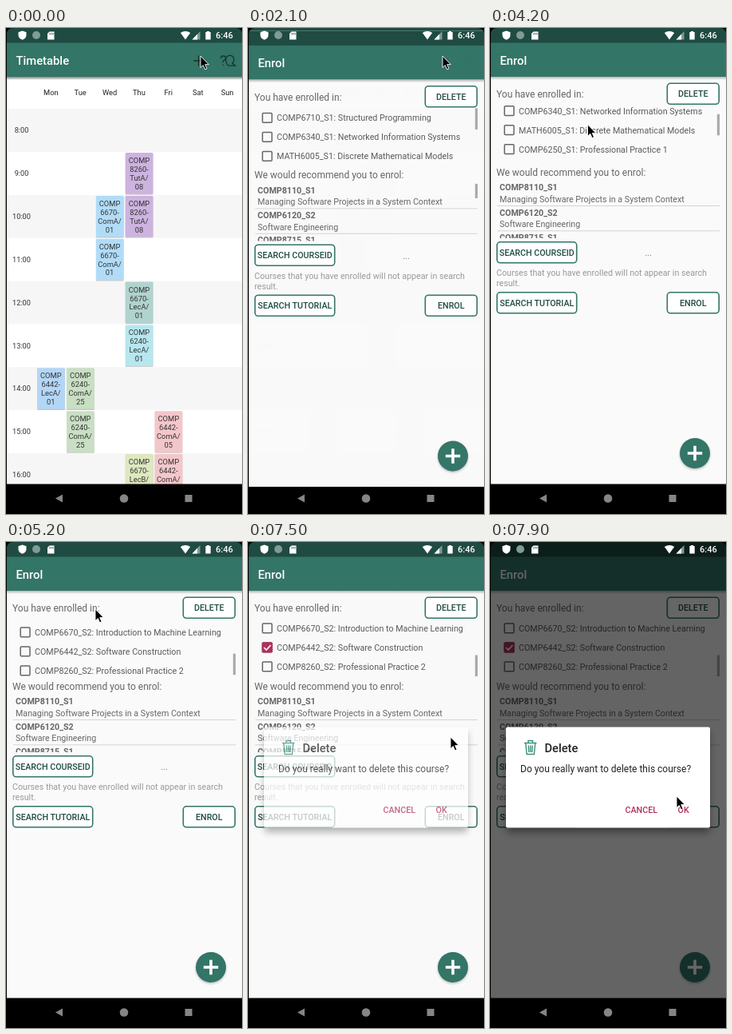
These frames come from a looping animation (296 by 608 pixels, 8000 ms). An HTML page:

```html
<!DOCTYPE html>
<html lang="en">
<head>
<meta charset="utf-8">
<title>Timetable</title>
<style>
html, body { margin: 0; width: 100%; height: 100%; overflow: hidden; background: #000; }
svg { display: block; }
text { font-family: Roboto, sans-serif; }
</style>
</head>
<body>
<svg id="stage" width="296" height="608" viewBox="0 0 296 608"></svg>
<script>
const GREEN = '#337567', DARK = '#1f4b42', PINK = '#b3305a';
const $ = id => document.getElementById(id);

const rect = (x, y, w, h, fill, more = '') =>
  `<rect x="${x}" y="${y}" width="${w}" height="${h}" fill="${fill}" ${more}/>`;
const path = (d, fill, more = '') => `<path d="${d}" fill="${fill}" ${more}/>`;
// Text placed by the middle of its capitals
const text = (x, mid, s, size, fill, weight = 400, anchor = 'start') =>
  `<text x="${x}" y="${mid + size * 0.355}" font-size="${size}" fill="${fill}" font-weight="${weight}" text-anchor="${anchor}">${s}</text>`;
const label = (x, mid, s, size, fill, weight) => text(x, mid, s, size, fill, weight, 'middle');

const chrome = (title, bg) =>
  rect(1, 0, 295, 571, bg) +
  rect(1, 61, 295, 4, 'url(#fall)') +
  rect(1, 0, 295, 19, DARK) + rect(1, 18.5, 295, 42.5, GREEN) +
  text(12.5, 40.5, title, 14.8, '#fff', 500) +
  rect(1, 570.5, 295, 60, '#000');

function timetable() {
  const colW = 36.875, rowH = 53.85, top = 101.2;
  const colors = { purple: '#cdb3df', sky: '#b1dcf8', teal: '#b1d3cf', cyan: '#b6e7ee',
    blue: '#b4d6f6', green: '#c8dfc3', pink: '#f4c6ca', lime: '#dde8bf' };
  const classes = [
    [4, 9, '8260 TutA 08', 'purple'], [4, 10, '8260 TutA 08', 'purple'],
    [3, 10, '6670 ComA 01', 'sky'], [3, 11, '6670 ComA 01', 'sky'],
    [4, 12, '6670 LecA 01', 'teal'], [4, 13, '6240 LecA 01', 'cyan'],
    [1, 14, '6442 LecA 01', 'blue'], [2, 14, '6240 ComA 25', 'green'],
    [2, 15, '6240 ComA 25', 'green'], [5, 15, '6442 ComA 05', 'pink'],
    [4, 16, '6670 LecB 01', 'lime'], [5, 16, '6442 ComA 05', 'pink']];
  let s = '';
  for (let h = 8; h <= 16; h++) {
    const y = top + (h - 8) * rowH;
    s += rect(1, y, 295, rowH, h % 2 ? '#fff' : '#f6f6f6') +
      label(19.5, y + rowH / 2, h + ':00', 9.2, '#333');
  }
  ['Mon', 'Tue', 'Wed', 'Thu', 'Fri', 'Sat', 'Sun'].forEach((d, i) =>
    s += label(1 + colW * (i + 1.5), 81, d, 9.3, '#222'));
  for (const [col, hour, name, color] of classes) {
    const x = 1 + col * colW, y = top + (hour - 8) * rowH;
    const [code, kind, group] = name.split(' ');
    s += rect(x + 1.3, y + 2, colW - 2.2, rowH - 2.2, '#000', 'opacity=".2" rx="1"') +
      rect(x + 1.2, y + 1, colW - 2.2, rowH - 2.4, colors[color], 'rx="1"');
    ['COMP', code + '-', kind + '/', group].forEach((line, i) =>
      s += label(x + colW / 2, y + 10.7 + i * 10.9, line, 9.33, '#333'));
  }
  const line = 'stroke="#17332d" stroke-width="1.3"';
  return rect(1, 61, 295, 41, '#fff') +
    chrome('Timetable', '#fff').replace(rect(1, 570.5, 295, 60, '#000'), s + rect(1, 570.5, 295, 60, '#000')) +
    rect(1, 61, 295, 4, 'url(#fall)') +
    path('M235 41h13M241.500 34.500v13', 'none', line) +
    path('M269.500 38q0-3 3-3t3 2.700q0 1.800-2 2.800t-1.300 2.500M272.200 45.500v1.300M276.300 42.500a5.300 5.300 0 1 1 7.500 1.500l3.700 3.200h-6.500q-4 0-4.700-4.700', 'none', line);
}

function button(x, y, w, s) {
  return rect(x + .8, y + .8, w - 1.6, 26, '#fff', `rx="4" stroke="${GREEN}" stroke-width="1.6"`) +
    label(x + w / 2, y + 14, s, 10.7, DARK, 500);
}

function enrol() {
  const courses = ['COMP6710_S1: Structured Programming', 'COMP6340_S1: Networked Information Systems',
    'MATH6005_S1: Discrete Mathematical Models', 'COMP6250_S1: Professional Practice 1',
    'COMP6240_S2: Relational Databases', 'COMP6670_S2: Introduction to Machine Learning',
    'COMP6442_S2: Software Construction', 'COMP8260_S2: Professional Practice 2'];
  const advice = [['COMP8110_S1', 'Managing Software Projects in a System Context'],
    ['COMP6120_S2', 'Software Engineering'], ['COMP8715_S1', 'Computing Project']];
  const rows = courses.map((c, i) => {
    const y = 12 + 24 * i;
    return rect(18.2, y - 6, 11.8, 11.8, 'none', 'rx="1" stroke="#666" stroke-width="1.5"') +
      text(36, y, c, 10.7, '#5a5a5a');
  }).join('');
  const tips = advice.map(([code, name], i) => {
    const y = 9.5 + 31.3 * i;
    return text(12, y, code, 10.7, '#666', 700) + text(12, y + 14.5, name, 10.7, '#666') +
      rect(9, y + 22.5, 279, 1, '#d4d4d4');
  }).join('');
  const tick = `<g id="tick">${rect(17.500, 149.300, 13.200, 13.200, PINK, 'rx="1.5"')}` +
    path('M20 156l3 3 5.500-6', 'none', 'stroke="#fff" stroke-width="1.6"') + '</g>';
  return chrome('Enrol', '#fafafa') +
    text(8, 83, 'You have enrolled in:', 12, '#666') +
    button(221.500, 68.500, 66.500, 'DELETE') +
    `<svg x="0" y="97" width="296" height="71"><g id="list">${rows}${tick}</g></svg>` +
    rect(284.800, 97, 3.200, 26.500, '#aaa', 'id="bar"') +
    text(8, 180.500, 'We would recommend you to enrol:', 12, '#666') +
    `<svg x="0" y="190" width="296" height="73">${tips}</svg>` +
    rect(284.800, 191.500, 3.200, 18, '#aaa', 'id="bar2"') +
    button(8, 267, 101.500, 'SEARCH COURSEID') +
    label(198.500, 281.500, '...', 10.7, '#777') +
    text(8, 306.500, 'Courses that you have enrolled will not appear in search', 10.7, '#999') +
    text(8, 319.500, 'result.', 10.7, '#999') +
    button(8, 330, 101.500, 'SEARCH TUTORIAL') + button(221.500, 330, 66.500, 'ENROL') +
    `<circle cx="257" cy="533.500" r="19" opacity=".25" filter="url(#soft)"/>` +
    `<circle cx="257" cy="532" r="19" fill="${GREEN}"/>` +
    path('M247.800 532h18.400M257 522.800v18.400', 'none', 'stroke="#fff" stroke-width="3.6"');
}

function dialog() {
  return rect(21, 238, 254, 125, '#000', 'opacity=".4" filter="url(#blur)"') +
    rect(20, 231.500, 256, 126, '#fff', 'rx="2"') +
    path('M43 251.500h15.500M48 251v-2.500h5.500v2.500M44.800 252l1.300 13.500h9.300l1.300-13.500M48.300 254.500l.5 8.500M50.800 254.500v8.500M53.200 254.500l-.5 8.500',
      'none', 'stroke="#3c8e7c" stroke-width="1.4"') +
    text(68.500, 258, 'Delete', 14.7, '#222', 500) +
    text(38, 283.500, 'Do you really want to delete this course?', 12, '#222') +
    text(169.500, 335, 'CANCEL', 10.7, PINK, 500) + text(235.500, 335, 'OK', 10.7, PINK, 500);
}

const system =
  path('M20.500 3.500l5 1.800v3.500q0 4.300-5 6-5-1.700-5-6v-3.500z', '#fff') +
  '<circle cx="38" cy="9" r="5" fill="#7f9c95"/>' +
  path('M54.500 4.500h6v10h-8.500v-7.500z', '#fff') + path('M55 6v2.500M57 6v2.500M59 6v2.500', 'none', `stroke="${DARK}" stroke-width=".8"`) +
  path('M218.800 6q6.200-4 12.400 0l-6.200 8.500z', '#fff') +
  path('M243.500 4v10.500h-10z', '#7f9c95') + path('M240 7.700v6.800h-6.500z', '#fff') +
  path('M252 4h3v1h1.700v9.500h-6.400v-9.500h1.700z', '#fff') +
  text(263, 9.500, '6:46', 11, '#fff', 500) +
  path('M71 583.500v10l-9-5z', '#858585') + '<circle cx="148" cy="588.500" r="5.300" fill="#858585"/>' +
  rect(224.500, 584, 9, 9, '#858585') +
  path('M0 0h9q-8 0-8 8v600h-1zM296 0h-8q8 0 8 8z', '#000');

$('stage').innerHTML =
  `<defs><linearGradient id="fall" x2="0" y2="1"><stop stop-opacity=".28"/><stop offset="1" stop-opacity="0"/></linearGradient>
  <filter id="soft"><feGaussianBlur stdDeviation="1.5"/></filter>
  <filter id="blur" x="-20%" y="-20%" width="140%" height="140%"><feGaussianBlur stdDeviation="5"/></filter></defs>` +
  `<g>${timetable()}</g><g id="enrol">${enrol()}</g>` +
  rect(1, 0, 295, 571, '#000', 'id="dim"') + `<g id="dialog">${dialog()}</g>` + system +
  path('M0 0v14.500l3.300-3 2.300 5.300 2.400-1-2.300-5.200h4.600z', '#000', 'id="cursor" stroke="#fff" stroke-width=".9"');

const pointer = [[0, 244, 35], [2600, 244, 35], [3300, 146, 71], [3500, 146, 71], [4000, 125, 150],
  [4400, 120, 92], [4700, 116, 142], [5200, 112, 84], [5300, 112, 84], [6100, 24, 133],
  [6400, 24, 133], [7050, 250, 84], [7250, 254, 86], [7500, 254, 244], [7900, 234, 318]];
const scrolling = [[0, 0], [4000, 0], [4400, 58], [4700, 58], [5200, 116], [5300, 121]];

const clamp = v => Math.max(0, Math.min(1, v));
const ramp = (t, start, length) => clamp((t - start) / length);

// Eased values between timed keys
function at(keys, t) {
  const i = keys.findIndex(k => k[0] > t);
  if (i < 0) return keys[keys.length - 1].slice(1);
  const a = keys[i - 1], b = keys[i], p = ramp(t, a[0], b[0] - a[0]), e = p * p * (3 - 2 * p);
  return a.slice(1).map((v, j) => v + (b[j + 1] - v) * e);
}

const set = (id, name, value) => $(id).setAttribute(name, value);

function draw(t) {
  const [x, y] = at(pointer, t), [scroll] = at(scrolling, t);
  set('cursor', 'transform', `translate(${x} ${y})`);
  set('enrol', 'opacity', 1 - (1 - ramp(t, 1957, 200)) ** 4);
  set('enrol', 'transform', `translate(0 ${48.6 * (1 - ramp(t, 1957, 350)) ** 5})`);
  set('list', 'transform', `translate(0 ${-scroll})`);
  set('bar', 'y', 97 + scroll / 121 * 44.5);
  set('bar2', 'opacity', 1 - ramp(t, 3400, 250));
  set('tick', 'opacity', t >= 6300 ? 1 : 0);
  set('dialog', 'opacity', 0.72 * ramp(t, 7420, 80) + 0.28 * ramp(t, 7500, 80));
  set('dim', 'opacity', 0.6 * ramp(t, 7500, 200));
}

function tick(now) {
  draw(now % 8000);
  requestAnimationFrame(tick);
}
draw(0);
requestAnimationFrame(tick);
</script>
</body>
</html>
```
